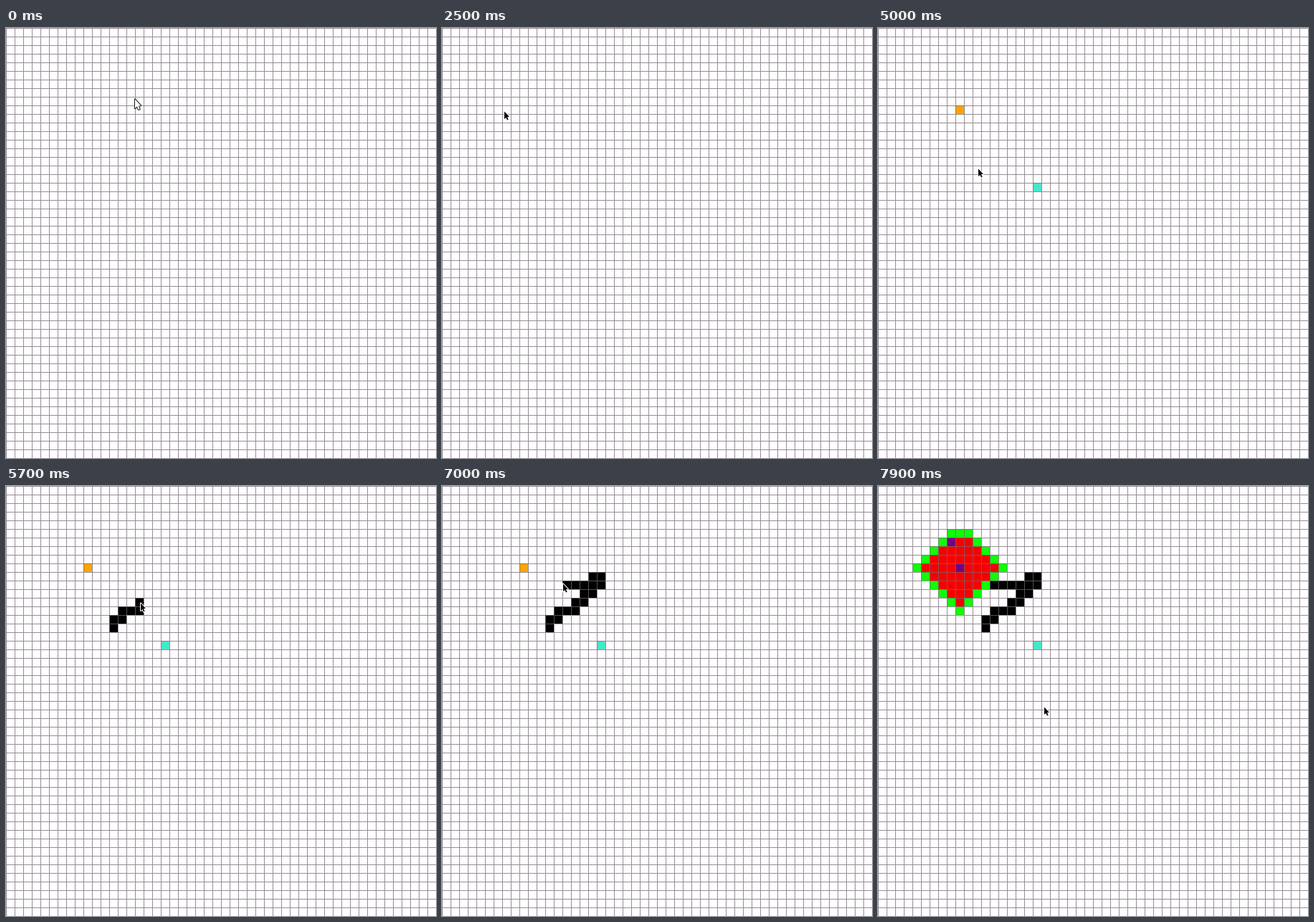
Recreate the animation shown at these times as an HTML page with a canvas. Size 600 px wide and 600 px high, loop 8 s.

```html
<!DOCTYPE html>
<html lang="en">
<head>
<meta charset="utf-8">
<title>Grid search</title>
<style>
  html, body { margin: 0; width: 100%; height: 100%; overflow: hidden; background: #fffdff; }
  canvas { display: block; }
</style>
</head>
<body>
<canvas id="stage" width="600" height="600"></canvas>
<script>
const ctx = document.getElementById('stage').getContext('2d');
const LOOP = 8000, TICK = 100, SIZE = 600, CELL = 12;
const START_CLICK = 2800, END_CLICK = 4000, DRAG_FROM = 5100, DRAG_TO = 7200;
const SEARCH_AT = 7300, VISIT_MS = 15, VISITS = 60;

const ARROW = new Path2D('M0 0V10.5L2.4 8.4 4 12 5.6 11.3 4 7.8 6.8 7.3Z');

// Visible stretches of the pointer; path points are [time, x, y].
const strokes = [
  { until: 400, path: [[0, 180, 99], [300, 193, 135]] },
  { until: 2000, path: [[1200, 384, 72], [1800, 141, 118]] },
  { until: LOOP, dark: true, path: [
    [2500, 87, 116], [2600, 113, 113], [3000, 113, 113], [3400, 335, 312], [3800, 221, 220],
    [4000, 221, 220], [4300, 110, 111], [4600, 132, 198], [4900, 132, 198], [5100, 148, 193],
    [5400, 163, 178], [5600, 182, 169], [6200, 217, 133], [6300, 217, 127], [6700, 176, 136],
    [6900, 169, 136], [7100, 169, 136], [7200, 163, 138], [7600, 245, 295], [7900, 232, 308]] }
];

function positionAt(path, t) {
  const i = path.findIndex(point => point[0] > t);
  if (i < 0) return path[path.length - 1].slice(1);
  const [a, b] = [path[i - 1], path[i]];
  const k = (t - a[0]) / (b[0] - a[0]);
  return [1, 2].map(n => Math.round(a[n] + (b[n] - a[n]) * k));
}

const strokeAt = t => strokes.find(s => t >= s.path[0][0] && t < s.until);
const cellAt = t => positionAt(strokeAt(t).path, t).map(v => Math.floor(v / CELL));

// Clicks place the two ends, dragging the pointer leaves walls.
const start = cellAt(START_CLICK), end = cellAt(END_CLICK);
const walls = [];
for (let at = DRAG_FROM; at <= DRAG_TO; at += TICK) walls.push({ at, cell: cellAt(at) });

// Breadth-first search, trying right, down, left, up.
function search(limit) {
  const seen = new Set([start, ...walls.map(wall => wall.cell)].map(String));
  const queue = [start], steps = [];
  while (steps.length < limit) {
    const cell = queue.shift();
    const added = [[1, 0], [0, 1], [-1, 0], [0, -1]]
      .map(([dx, dy]) => [cell[0] + dx, cell[1] + dy])
      .filter(next => !seen.has(String(next)));
    added.forEach(next => { seen.add(String(next)); queue.push(next); });
    steps.push({ cell, added });
  }
  return steps;
}
const steps = search(VISITS);

function paint([col, row], color) {
  ctx.fillStyle = color;
  ctx.fillRect(col * CELL, row * CELL, CELL, CELL);
}

function drawCells(t) {
  if (t >= START_CLICK) paint(start, '#faa408');
  if (t >= END_CLICK) paint(end, '#48e6c8');
  walls.filter(wall => t >= wall.at).forEach(wall => paint(wall.cell, '#000'));

  const count = Math.max(0, Math.round((t - SEARCH_AT) / VISIT_MS));
  const visited = steps.slice(0, count);
  visited.forEach(step => step.added.forEach(cell => paint(cell, '#10fc08')));
  visited.forEach(({ cell }, i) => paint(cell, i === 0 || i === count - 1 ? '#760080' : '#f60000'));
}

function drawGrid() {
  ctx.beginPath();
  for (let p = 0; p < SIZE; p += CELL) {
    ctx.rect(p, 0, 1, SIZE);
    ctx.rect(0, p, SIZE, 1);
  }
  ctx.fillStyle = 'rgba(112, 106, 113, 0.75)';
  ctx.fill();
}

function drawPointer(t) {
  const stroke = strokeAt(t);
  if (!stroke) return;
  const [x, y] = positionAt(stroke.path, t);
  const scale = stroke.dark ? 1 : 1.2;
  ctx.save();
  ctx.translate(x, y + 0.5);
  ctx.scale(scale, scale);
  ctx.lineJoin = 'round';
  ctx.lineWidth = stroke.dark ? 2 : 1.8;
  ctx.strokeStyle = stroke.dark ? '#fff' : '#222';
  ctx.fillStyle = stroke.dark ? '#000' : '#fff';
  ctx.stroke(ARROW);
  ctx.fill(ARROW);
  ctx.restore();
}

function render(now) {
  const t = Math.floor(now % LOOP / TICK) * TICK;
  ctx.fillStyle = '#fffdff';
  ctx.fillRect(0, 0, SIZE, SIZE);
  drawCells(t);
  drawGrid();
  drawPointer(t);
}

let begin;
function frame(now) {
  begin ??= now;
  render(now - begin);
  requestAnimationFrame(frame);
}
requestAnimationFrame(frame);
</script>
</body>
</html>
```
